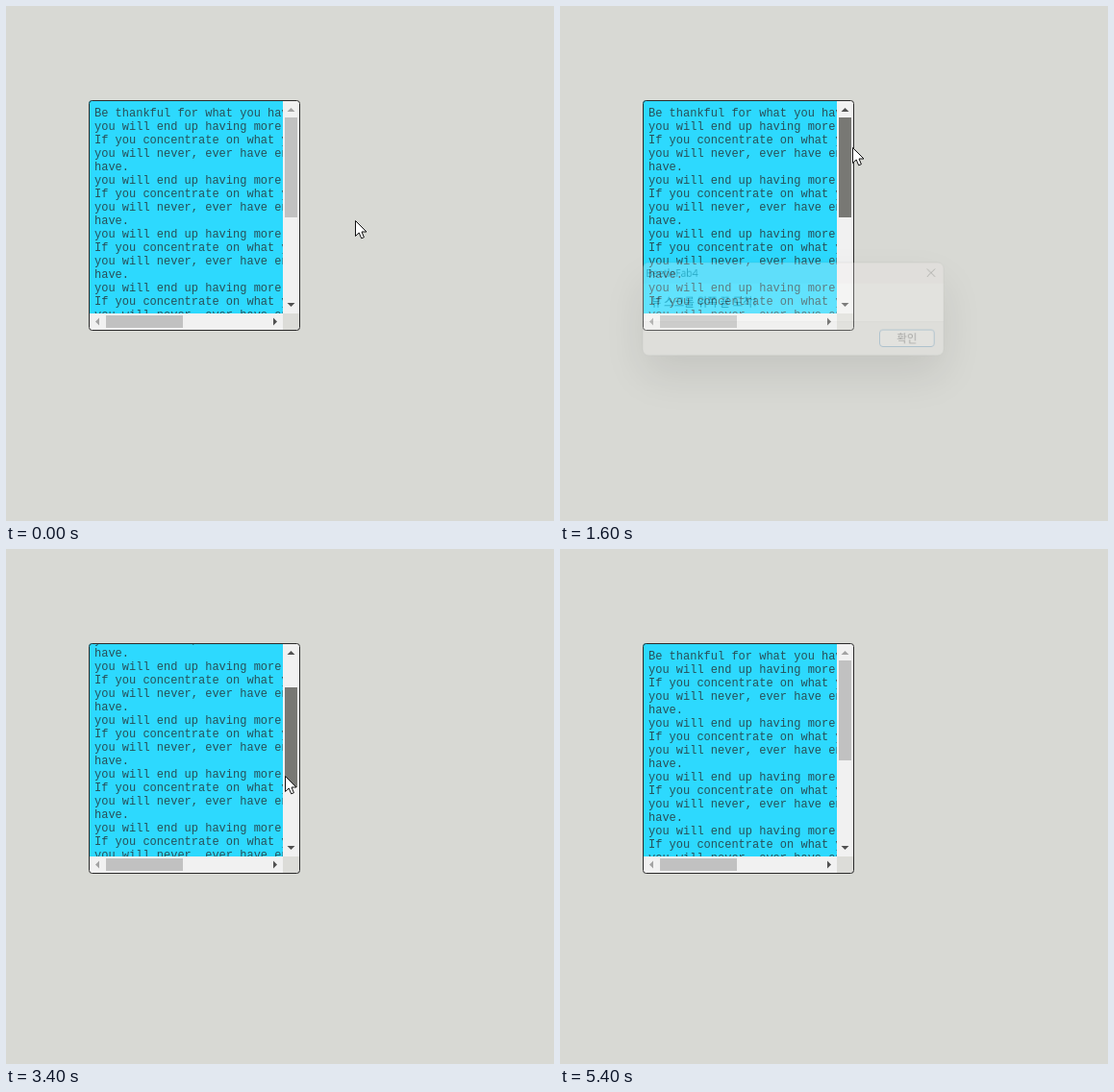
An HTML page with a canvas that plays this animation: 570 by 536 pixels, repeating every 5.5 s.

```html
<!DOCTYPE html>
<html lang="ko">
<head>
<meta charset="utf-8">
<title>Scroll view</title>
<style>
html, body { margin: 0; width: 100%; height: 100%; overflow: hidden; background: #d8d9d4; }
canvas { display: block; }
</style>
</head>
<body>
<canvas id="stage" width="570" height="536"></canvas>
<script>
const W = 570, H = 536, LOOP = 5500, STEP = 100, MOVE = 400;
const ctx = document.getElementById('stage').getContext('2d');
const KOREAN = '"Noto Sans CJK KR", "Noto Sans CJK", sans-serif';

const VERSE = [
  'you will end up having more.',
  'If you concentrate on what you',
  'you will never, ever have enough',
  'have.'
];
const LINES = ['Be thankful for what you have;'];
for (let i = 0; i < 28; i++) LINES.push(VERSE[i % 4]);

const point = (x, y) => ({ x, y });
const REST = point(363, 223), BUTTON = point(388, 348), EXIT = point(404, 27);
const PIVOT = point(186, 287);

// Each cycle: grab the thumb, pull it down, push it past the top, confirm the dialog.
const CYCLES = [
  { press: 800, grip: point(294, 199), low: point(300, 225), high: point(305, 133) },
  { press: 2900, grip: point(298, 208), low: point(290, 236), high: point(288, 132) }
];
const UP = 500, OPEN = 800, CONFIRM = 1000, LEAVE = 1600, CLOSE = 1700, GONE = 1900;

const MOVES = CYCLES.flatMap(({ press, grip, low, high }) => [
  { at: press - 500, to: grip },
  { at: press, to: low },
  { at: press + UP, to: high },
  { at: press + CONFIRM, to: BUTTON }
]);
MOVES[0].at = 0;
const lastPress = CYCLES[CYCLES.length - 1].press;
MOVES.push({ at: lastPress + LEAVE, to: EXIT, span: 200 });

const clamp01 = u => Math.max(0, Math.min(1, u));
const smooth = u => u * u * (3 - 2 * u);

function pointerAt(t) {
  if (t >= lastPress + GONE) return null;
  let { x, y } = REST;
  for (const { at, to, span = MOVE } of MOVES) {
    const k = smooth(clamp01((t - at) / span));
    x += (to.x - x) * k;
    y += (to.y - y) * k;
  }
  return point(Math.round(x), Math.round(y));
}

function box(c, color, x, y, w, h) {
  c.fillStyle = color;
  c.fillRect(x, y, w, h);
}

function rounded(c, x, y, w, h, r) {
  c.beginPath();
  c.roundRect(x, y, w, h, r);
}

function label(c, text, x, y, font, color) {
  c.font = font;
  c.fillStyle = color;
  c.fillText(text, x, y);
}

function polygon(c, points) {
  c.beginPath();
  points.forEach(([x, y]) => c.lineTo(x, y));
  c.closePath();
}

function arrow(x, y, dx, dy, enabled) {
  ctx.fillStyle = enabled ? '#505050' : '#a3a3a3';
  polygon(ctx, [
    [x + dx * 2, y + dy * 2],
    [x - dx * 2 + dy * 4, y - dy * 2 + dx * 4],
    [x - dx * 2 - dy * 4, y - dy * 2 - dx * 4]
  ]);
  ctx.fill();
}

function drawView(offset, thumbColor, active) {
  ctx.save();
  rounded(ctx, 86, 98, 220, 240, 4);
  ctx.clip();
  box(ctx, '#2dd9fe', 86, 98, 202, 222);
  const scroll = Math.floor(offset * 2.13);
  LINES.forEach((line, i) => label(ctx, line, 92, 115 + i * 14 - scroll,
    '12px "Liberation Mono", monospace', '#28505a'));

  box(ctx, '#f1f1f1', 288, 98, 18, 222);
  box(ctx, '#f1f1f1', 86, 320, 202, 18);
  box(ctx, '#dcdcd8', 288, 320, 18, 18);
  box(ctx, thumbColor, 290, 116 + offset, 13, 104);
  box(ctx, '#c1c1c1', 104, 322, 80, 13);
  arrow(296.5, 108, 0, -1, active);
  arrow(296.5, 311, 0, 1, true);
  arrow(95, 328.5, -1, 0, false);
  arrow(280, 328.5, 1, 0, true);
  ctx.restore();

  ctx.strokeStyle = '#2a2a2a';
  ctx.lineWidth = 1;
  rounded(ctx, 86.5, 98.5, 219, 239, 3);
  ctx.stroke();
}

function makeDialog(hover) {
  const layer = document.createElement('canvas');
  layer.width = W;
  layer.height = H;
  const c = layer.getContext('2d');
  const outline = () => rounded(c, 71, 264, 360, 111, 7);

  c.save();
  c.shadowColor = 'rgba(0,0,0,.36)';
  c.shadowBlur = 50;
  c.shadowOffsetY = 24;
  c.fillStyle = '#eeefeb';
  outline();
  c.fill();
  c.restore();

  c.save();
  outline();
  c.clip();
  box(c, '#f5efed', 71, 264, 360, 25);
  box(c, '#fffffc', 71, 289, 360, 45);
  box(c, '#dededb', 71, 334, 360, 1);
  c.restore();
  c.lineWidth = 1;
  c.strokeStyle = 'rgba(90,90,90,.3)';
  outline();
  c.stroke();

  label(c, 'BeetleFab4', 75, 281, '12px "Open Sans", sans-serif', '#1a1a1a');
  label(c, '뷰 스크롤 위쪽 끝 도착!', 81, 316, '13.3px ' + KOREAN, '#111');
  c.strokeStyle = '#222';
  c.beginPath();
  c.moveTo(411, 271.5); c.lineTo(420.5, 281);
  c.moveTo(420.5, 271.5); c.lineTo(411, 281);
  c.stroke();

  rounded(c, 354.5, 344.5, 65, 20, 3.5);
  c.fillStyle = hover ? '#e6f1f8' : '#fdfdfc';
  c.fill();
  c.strokeStyle = '#2478b4';
  c.stroke();
  label(c, '확인', 375, 359, '13px ' + KOREAN, '#111');
  return layer;
}

const dialogs = [makeDialog(false), makeDialog(true)];

function drawDialog(scale, alpha, hover) {
  ctx.save();
  ctx.globalAlpha = alpha;
  ctx.translate(PIVOT.x, PIVOT.y);
  ctx.scale(scale, scale);
  ctx.drawImage(dialogs[+hover], -PIVOT.x, -PIVOT.y);
  ctx.restore();
}

function drawPointer({ x, y }) {
  ctx.save();
  ctx.translate(x + 0.5, y + 0.5);
  polygon(ctx, [[0, 0], [0, 16], [3.7, 12.5], [6.2, 18.3], [8.9, 17.2], [6.5, 11.5], [11.5, 11.5]]);
  ctx.fillStyle = '#fff';
  ctx.fill();
  ctx.strokeStyle = '#111';
  ctx.lineWidth = 1;
  ctx.stroke();
  ctx.restore();
}

function render(t) {
  const pointer = pointerAt(t);
  const cycle = CYCLES.find(({ press }) => t >= press && t < press + CLOSE + STEP);
  const age = cycle ? t - cycle.press : 0;
  const pressed = cycle && age < CLOSE;
  const overThumb = pointer && pointer.x >= 288 && pointer.x < 305 && pointer.y < 220;
  const thumb = pressed ? '#787874' : overThumb ? '#a8a8a8' : '#c1c1c1';
  const offset = pressed && age < OPEN ? Math.max(0, pointer.y - cycle.grip.y) : 0;

  box(ctx, '#d8d9d4', 0, 0, W, H);
  drawView(offset, thumb, pressed);
  if (cycle && age >= OPEN) {
    const shown = clamp01((age - OPEN) / (2 * STEP));
    const hover = pointer.x >= 354 && pointer.y >= 344;
    if (pressed) drawDialog(1 - 0.13 * (1 - shown) ** 1.6, Math.min(1, 0.25 + 1.5 * shown), hover);
    else drawDialog(0.94, 0.4, hover);
  }
  if (pointer) drawPointer(pointer);
}

const start = performance.now();
function tick() {
  const t = (performance.now() - start) % LOOP;
  render(Math.floor(t / STEP) * STEP);
  requestAnimationFrame(tick);
}
tick();
</script>
</body>
</html>
```
